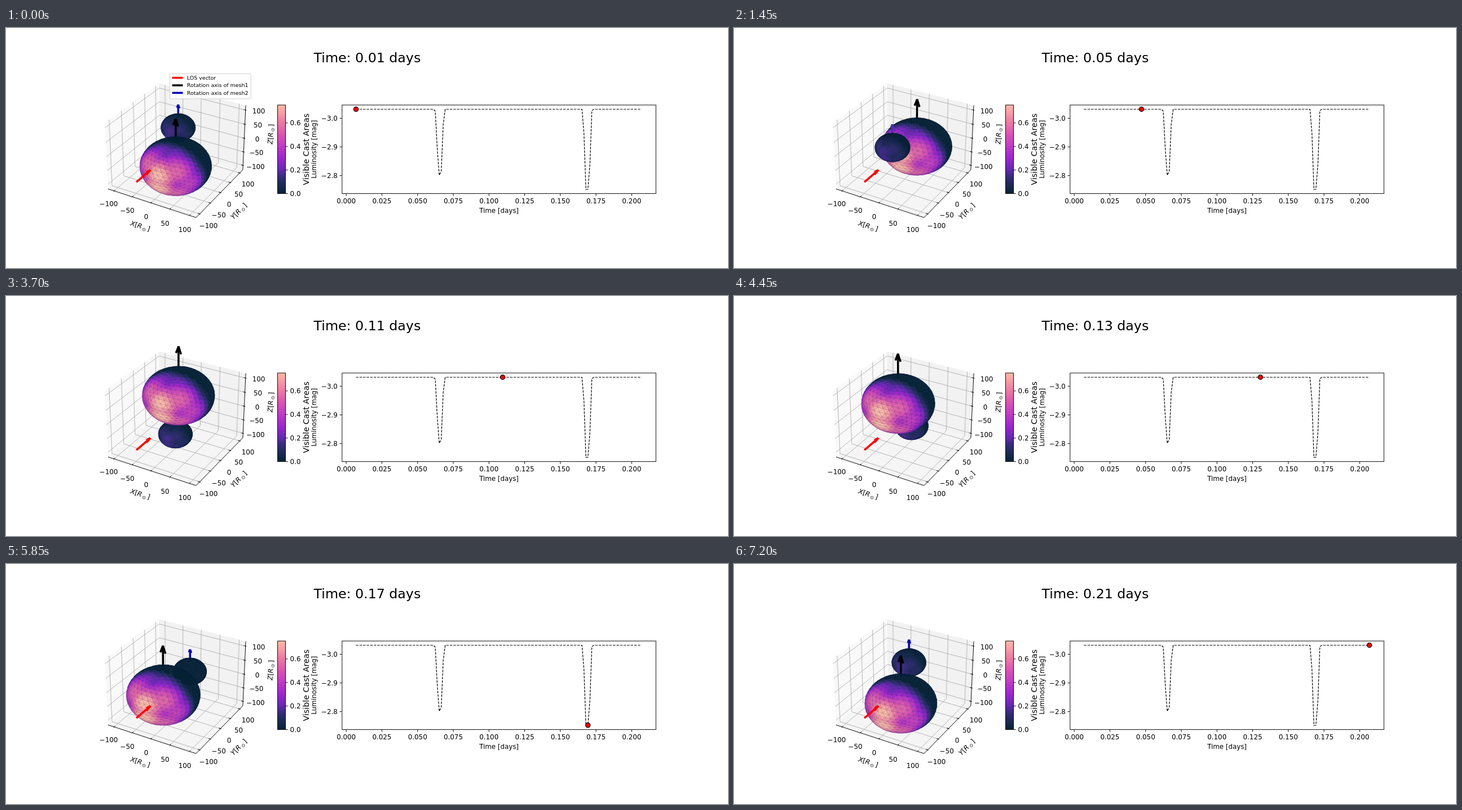
Recreate the animation shown at these times as an HTML page with a canvas. Size 1280 by 427 pixels, loop 7250 ms.

```html
<!DOCTYPE html>
<html lang="en">
<head>
<meta charset="utf-8">
<title>Binary star light curve</title>
<style>
  html, body { margin: 0; width: 100%; height: 100%; overflow: hidden; background: #fff; }
  canvas, svg { position: absolute; left: 0; top: 0; width: 1280px; height: 427px; }
  text { font-family: "DejaVu Sans", sans-serif; font-size: 11.85px; fill: #000; }
  .math { font-style: oblique; }
  .up { font-style: normal; }
  .sub { font-style: normal; font-size: 8.3px; }
  .thin { fill: none; stroke: #000; stroke-width: .95; }
</style>
</head>
<body>
<canvas id="scene"></canvas>
<svg id="chart" viewBox="0 0 1280 427">
  <defs><linearGradient id="ramp" x1="0" y1="1" x2="0" y2="0"></linearGradient></defs>
  <rect x="481.5" y="137" width="14" height="157.6" fill="url(#ramp)" stroke="#000" stroke-width=".95"/>
  <rect class="thin" x="595.8" y="137" width="556.4" height="157.6"/>
  <path id="curve" fill="none" stroke="#000" stroke-width="1.185" stroke-dasharray="4.38 1.9"/>
  <circle id="dot" r="4.15" fill="#f00" stroke="#000" stroke-width="1.185"/>
  <g id="legend">
    <rect x="290.4" y="81.4" width="143.8" height="44.6" rx="2" fill="#fff" fill-opacity=".8" stroke="#ccc" stroke-width=".95"/>
  </g>
</svg>
<script>
const STEPS = 145, STEP_MS = 50, CYCLE = 149, PERIOD = 0.207;
const H = 0.595, LIMIT = 116.6;            // half box size, axis limit
const BIG = 0.4254, SMALL = 0.2017, RATIO = SMALL / BIG;
const CENTER = [0, .006, .004], ORBIT = [-.022, .314, .304];
const CONJUNCTION = 114.3, SEPARATION = 14.9;
const NU = 8;                              // mesh subdivisions
const TICKS = [-100, -50, 0, 50, 100];
const RAMP = [
  [0, 4, 35, 51], [.12, 34, 43, 92], [.2, 58, 44, 128], [.28, 105, 41, 180], [.4, 156, 38, 206],
  [.53, 190, 58, 196], [.67, 218, 85, 178], [.8, 235, 122, 163], [1, 253, 186, 168]
];

const svg = document.getElementById('chart');
const $ = id => document.getElementById(id);
const canvas = $('scene'), ctx = canvas.getContext('2d');
const dpr = window.devicePixelRatio || 1;
canvas.width = 1280 * dpr;
canvas.height = 427 * dpr;

function add(tag, attrs, parent = svg) {
  const el = document.createElementNS('http://www.w3.org/2000/svg', tag);
  for (const key in attrs) el.setAttribute(key, attrs[key]);
  parent.appendChild(el);
  return el;
}

function label(str, x, y, opts = {}) {
  const { size = 11.85, anchor = 'middle', turn = 0, parent = svg } = opts;
  const el = add('text', { x, y, 'text-anchor': anchor, style: `font-size:${size}px` }, parent);
  if (turn) el.setAttribute('transform', `rotate(${turn} ${x} ${y})`);
  el.textContent = str;
  return el;
}

const num = v => String(v).replace('-', '\u2212');
const mix = (a, b, f) => a + (b - a) * f;

function shade(v) {
  v = Math.min(1, Math.max(0, v));
  let i = 1;
  while (RAMP[i][0] < v) i++;
  const a = RAMP[i - 1], b = RAMP[i], f = (v - a[0]) / (b[0] - a[0]);
  return `rgb(${[1, 2, 3].map(c => Math.round(mix(a[c], b[c], f)))})`;
}

// Perspective view: elevation 30, azimuth -60.
const toward = (x, y, z) => .433 * x - .75 * y + .375 * z;
function project(x, y, z) {
  const w = 1 - toward(x, y, z) / 10;
  return [
    302.6 + 150.2 * (.866 * x + .5 * y) / w,
    212.2 - 150.2 * (-.25 * x + .433 * y + .6495 * z) / w
  ];
}

function trace(points, close) {
  ctx.beginPath();
  points.forEach((p, i) => {
    const [x, y] = project(...p);
    i ? ctx.lineTo(x, y) : ctx.moveTo(x, y);
  });
  if (close) ctx.closePath();
}

function line(color, width, ...points) {
  trace(points);
  ctx.strokeStyle = color;
  ctx.lineWidth = width;
  ctx.stroke();
}

function pane(color, ...points) {
  trace(points, true);
  ctx.fillStyle = color;
  ctx.fill();
}

function drawBox() {
  pane('#f9f9f9', [-H, -H, -H], [-H, H, -H], [-H, H, H], [-H, -H, H]);
  pane('#f2f2f2', [-H, H, -H], [H, H, -H], [H, H, H], [-H, H, H]);
  pane('#f5f5f5', [-H, -H, -H], [H, -H, -H], [H, H, -H], [-H, H, -H]);
  const at = TICKS.map(t => t / LIMIT * H), grid = '#b0b0b0';
  for (const t of at) {
    line(grid, .95, [t, -H, -H], [t, H, -H], [t, H, H]);
    line(grid, .95, [H, t, -H], [-H, t, -H], [-H, t, H]);
    line(grid, .95, [-H, -H, t], [-H, H, t], [H, H, t]);
  }
  line('#000', .95, [-H, -H, -H], [H, -H, -H]);
  line('#000', .95, [H, -H, -H], [H, H, -H]);
  line('#000', .95, [H, H, -H], [H, H, H]);
  const out = H + .012, inn = H - .024;
  for (const t of at) {
    line('#000', .95, [t, -out, -H], [t, -inn, -H]);
    line('#000', .95, [inn, t, -H], [out, t, -H]);
    line('#000', .95, [inn, H, t], [out, H, t]);
  }
}

// Icosahedron split into small triangles pushed out to the unit sphere.
function buildMesh() {
  const g = (1 + Math.sqrt(5)) / 2, base = [], faces = [];
  for (const a of [-1, 1]) for (const b of [-g, g]) base.push([0, a, b], [a, b, 0], [b, 0, a]);
  const unit = v => { const r = Math.hypot(...v); return v.map(c => c / r); };
  const minus = (a, b) => a.map((c, i) => c - b[i]);
  const cross = (a, b) => [a[1] * b[2] - a[2] * b[1], a[2] * b[0] - a[0] * b[2], a[0] * b[1] - a[1] * b[0]];
  const dot = (a, b) => a[0] * b[0] + a[1] * b[1] + a[2] * b[2];
  const near = (a, b) => Math.hypot(...minus(a, b)) < 2.1;

  function addFace(a, b, c) {
    const n = cross(minus(b, a), minus(c, a));
    const mid = unit(a.map((v, i) => v + b[i] + c[i]));
    faces.push({ pts: dot(n, mid) > 0 ? [a, b, c] : [a, c, b], mid, area: Math.hypot(...n) });
  }

  function split(A, B, C) {
    const at = (i, j) => unit(A.map((v, k) => v * (NU - i - j) + B[k] * i + C[k] * j));
    for (let i = 0; i < NU; i++) for (let j = 0; j < NU - i; j++) {
      addFace(at(i, j), at(i + 1, j), at(i, j + 1));
      if (i + j < NU - 1) addFace(at(i + 1, j), at(i + 1, j + 1), at(i, j + 1));
    }
  }

  for (let i = 0; i < 12; i++) for (let j = i + 1; j < 12; j++) for (let k = j + 1; k < 12; k++)
    if (near(base[i], base[j]) && near(base[j], base[k]) && near(base[i], base[k]))
      split(base[i], base[j], base[k]);

  const lit = f => f.area * Math.max(0, -f.mid[1]);
  const peak = Math.max(...faces.map(lit));
  faces.forEach(f => { f.light = lit(f) / peak; });
  return faces;
}
const mesh = buildMesh();

function drawStar(pos, radius, gain, hidden) {
  ctx.lineWidth = .5;
  ctx.lineJoin = 'round';
  for (const f of mesh) {
    const [a, b, c] = f.pts.map(p => project(...p.map((v, i) => pos[i] + v * radius)));
    if ((b[0] - a[0]) * (c[1] - a[1]) - (b[1] - a[1]) * (c[0] - a[0]) >= 0) continue;
    const color = shade(f.light && !hidden(f.mid) ? f.light * gain : 0);
    ctx.beginPath();
    ctx.moveTo(...a);
    ctx.lineTo(...b);
    ctx.lineTo(...c);
    ctx.closePath();
    ctx.fillStyle = ctx.strokeStyle = color;
    ctx.fill();
    ctx.stroke();
    ctx.strokeStyle = 'rgba(20,30,80,.36)';
    ctx.stroke();
  }
}

function drawAxis([x, y, z], radius, color) {
  const tip = [x, y, z + 2 * radius], head = .3 * radius;
  line(color, 3.56, [x, y, z + radius], tip);
  for (const s of [-1, 1])
    line(color, 3.56, tip, [x + s * head * .2588, y, tip[2] - head * .9659]);
}

function drawSight() {
  const tip = [0, -.593, 0], head = .087;
  line('#f00', 3.56, [0, -.888, 0], tip);
  for (const s of [-1, 1]) line('#f00', 3.56, tip, [0, tip[1] - head * .9659, s * head * .2588]);
}

function drawScene(step) {
  const angle = ((step + 5) / CYCLE * 360 - CONJUNCTION) * Math.PI / 180;
  const s = Math.sin(angle), c = Math.cos(angle);
  const offset = [ORBIT[0] * s, ORBIT[1] * c, ORBIT[2] * s];
  const big = CENTER.map((v, i) => v + offset[i]);
  const small = CENTER.map((v, i) => v - offset[i]);
  const gapX = SEPARATION * .07 * s, gapZ = -SEPARATION * s;
  const bigHidden = n => c > 0 && Math.hypot(n[0] - gapX, n[2] - gapZ) < RATIO;
  const smallHidden = n => c < 0 && Math.hypot(n[0] * RATIO + gapX, n[2] * RATIO + gapZ) < 1;
  const depthBig = toward(...big), depthSmall = toward(...small);
  const smallInk = depthSmall > .1 ? '#4a30a8' : '#0000b4';

  ctx.setTransform(dpr, 0, 0, dpr, 0, 0);
  ctx.fillStyle = '#fff';
  ctx.fillRect(0, 0, 1280, 427);
  drawBox();
  // Parts are layered by their nearest point.
  [
    [depthBig + .402, () => drawStar(big, BIG, 1, bigHidden)],
    [depthBig + .319, () => drawAxis(big, BIG, '#000')],
    [depthSmall + .191, () => drawStar(small, SMALL, RATIO * RATIO, smallHidden)],
    [depthSmall + .151, () => drawAxis(small, SMALL, smallInk)]
  ].sort((a, b) => a[0] - b[0]).forEach(part => part[1]());
  drawSight();
}

// Light curve: flat except at the two eclipses.
const DIPS = { 40: 148, 41: 215, 42: 262, 43: 255, 44: 172, 115: 187, 116: 287.3, 117: 286.8, 118: 243, 119: 147 };
const curveX = k => 620.5 + 3.514 * k;
const curveY = k => DIPS[k] || 144.5;

function mathLabel(letter, x, y, turn) {
  const el = label('', x, y, { turn });
  const part = (str, cls, shift = {}) => { add('tspan', { class: cls, ...shift }, el).textContent = str; };
  part(letter, 'math');
  part('[', 'up');
  part('R', 'math');
  part('\u2299', 'sub', { dx: 1.66, dy: 2.4 });
  part(']', 'up', { dx: 1.66, dy: -2.4 });
}

function tick(x, y, dx, dy) {
  add('path', { class: 'thin', d: `M${x} ${y}l${dx} ${dy}` });
}

function buildChart() {
  for (const [at, ...rgb] of RAMP) add('stop', { offset: at, 'stop-color': `rgb(${rgb})` }, $('ramp'));
  let d = '';
  for (let k = 0; k < STEPS; k++) d += (k ? 'L' : 'M') + curveX(k).toFixed(2) + ' ' + curveY(k);
  $('curve').setAttribute('d', d);

  for (let i = 0; i < 9; i++) {
    const x = 603.2 + 63.26 * i;
    tick(x, 294.6, 0, 4.15);
    label((i * .025).toFixed(3), x, 312);
  }
  for (let i = 0; i < 3; i++) {
    const y = 160.6 + 51 * i;
    tick(595.8, y, -4.15, 0);
    label(num((-3 + i * .1).toFixed(1)), 587.8, y + 4.4, { anchor: 'end' });
  }
  for (let i = 0; i < 4; i++) {
    const y = 294.6 - 41.9 * i;
    tick(495.5, y, 4.15, 0);
    label((i * .2).toFixed(1), 503.6, y + 4.4, { anchor: 'start' });
  }
  label('Time [days]', 874, 328.6);
  label('Luminosity [mag]', 550.3, 215.8, { turn: -90 });
  label('Visible Cast Areas', 537.4, 215.8, { size: 14.22, turn: -90 });

  const xs = [[182, 313], [215, 324.5], [248.5, 336], [282, 347.2], [317, 358.8]];
  const ys = [[359, 352], [377.3, 332.5], [395.6, 314], [412.5, 295.5], [429, 278]];
  const zs = [[442.4, 246.3], [443.9, 221.8], [445.4, 197.3], [446.5, 172.3], [448, 147.5]];
  for (const set of [xs, ys, zs]) set.forEach(([x, y], i) => label(num(TICKS[i]), x, y + 4.4));
  mathLabel('X', 236.8, 356.3, 17.8);
  mathLabel('Y', 415.6, 328.6, -45.7);
  mathLabel('Z', 473.2, 189, -87);

  const legend = $('legend');
  [['LOS vector', '#f00'], ['Rotation axis of mesh1', '#000'], ['Rotation axis of mesh2', '#0000bb']].forEach(([str, color], i) => {
    const y = 88.6 + 13.4 * i;
    add('path', { d: `M294.6 ${y}h18.9`, stroke: color, 'stroke-width': 3.56 }, legend);
    label(str, 320.8, y + 3.4, { size: 9.48, anchor: 'start', parent: legend });
  });
}

buildChart();
const title = label('', 640.4, 61, { size: 23.7 });
let shown = -1;

function render(ms) {
  const step = Math.floor(ms / STEP_MS) % STEPS;
  if (step === shown) return;
  shown = step;
  drawScene(step);
  title.textContent = `Time: ${((step + 5) / CYCLE * PERIOD).toFixed(2)} days`;
  $('dot').setAttribute('cx', curveX(step));
  $('dot').setAttribute('cy', curveY(step));
  $('legend').style.display = step ? 'none' : '';
}

function loop() {
  render(performance.now());
  requestAnimationFrame(loop);
}
loop();
</script>
</body>
</html>
```
